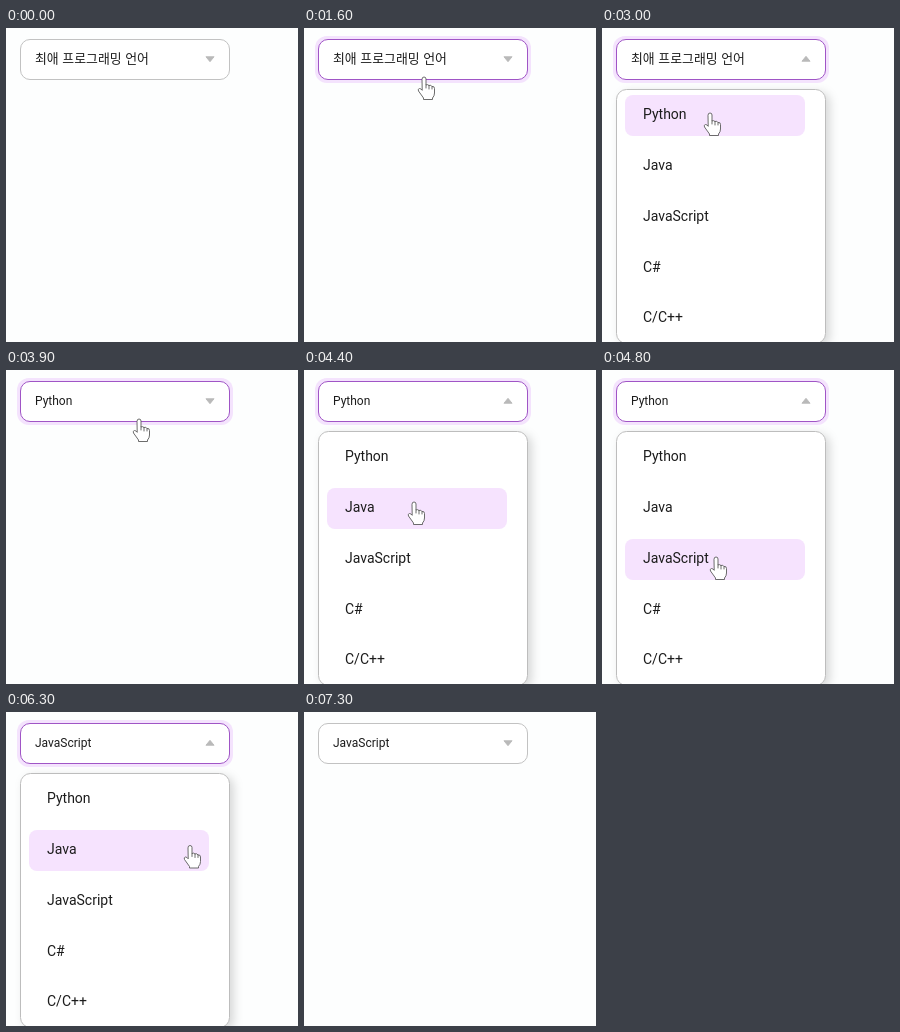
An HTML page that plays this animation: 292 by 314 pixels, repeating every 10000 ms.

```html
<!DOCTYPE html>
<html lang="ko">
<head>
<meta charset="utf-8">
<title>Select box</title>
<style>
html, body { margin: 0; width: 100%; height: 100%; overflow: hidden; background: #fdfefe; }
svg { display: block; }
text { fill: #1c1c1c; font: 14px Roboto, sans-serif; }
#label { font-size: 12px; }
#label.hint { font: 300 12.9px "Noto Sans CJK KR", "Noto Sans CJK", sans-serif; }
#panel { filter: drop-shadow(4px 3px 5px rgba(0, 0, 0, .15)); }
#pointer path { fill: #fff; stroke: #5c5c5c; stroke-width: .9; stroke-linejoin: round; stroke-linecap: round; }
</style>
</head>
<body>
<svg width="292" height="314" viewBox="0 0 292 314">
  <rect id="ring" x="11" y="8" width="216" height="47" rx="12" fill="#f4e3fd"/>
  <rect id="button" x="14.5" y="11.5" width="209" height="40" rx="9.5" fill="#fff"/>
  <text id="label" x="29" y="35"></text>
  <path id="caret" d="M-4.5 -2.5H4.5L0 3Z" fill="#b9b9b9" stroke="#b9b9b9" stroke-linejoin="round"/>
  <g id="list">
    <rect id="panel" x="14.5" y="61.5" width="209" height="254" rx="10" fill="#fff" stroke="#bdbdbd"/>
    <rect id="hover" x="23" width="180" height="41" rx="8" fill="#f6e3fe"/>
  </g>
  <g id="pointer">
    <path id="arrow" d="M.5 .5V16.5L4.3 12.9 6.8 18.8 9.3 17.7 6.8 12H11.5Z"/>
    <path id="hand" d="M-2 2Q-2 0 0 0T2 2V8Q3.5 7 5 8.5 7 7.5 8 9.5 10.5 9 10.5 11.5V16Q10.5 19 8.5 21V22.5H-.5V21L-5.5 14Q-6.5 12 -4.5 11.5 -3 11.5 -2 13ZM2 8V11M5 8.5V12M8 9.5V12"/>
  </g>
</svg>
<script>
const $ = id => document.getElementById(id);
const show = (id, on) => $(id).setAttribute('visibility', on ? 'inherit' : 'hidden');

const LOOP = 10000, STEP = 100, ROW_HEIGHT = 41, EDGE = 49;
const items = ['Python', 'Java', 'JavaScript', 'C#', 'C/C++'];
const rowTop = i => Math.round(67.2 + i * 50.8);
const rowMid = i => rowTop(i) + 18;

items.forEach((name, i) => $('list').insertAdjacentHTML('beforeend',
  `<text x="41" y="${rowTop(i) + 24}">${name}</text>`));

// the list opens shortly after the button takes focus; closing drops both
const visits = [
  { open: 1700, close: 3300, pick: 'Python' },
  { open: 4000, close: 5100, pick: 'JavaScript' },
  { open: 6100, close: 6800 }
];

// the pointer rests between moves
const entry = { x: 160, y: 246 };
const moves = [
  { from: 300, to: 1100, x: 120, y: EDGE },
  { from: 1900, to: 2500, x: 100, y: rowMid(1) - 13 },
  { from: 2600, to: 3000, x: 108, y: rowMid(0) },
  { from: 3200, to: 3800, x: 133, y: EDGE },
  { from: 4000, to: 4400, x: 110, y: rowMid(1) - 4 },
  { from: 4400, to: 4800, x: 114, y: rowMid(2) },
  { from: 5000, to: 5800, x: 125, y: EDGE },
  { from: 6000, to: 6600, x: 243, y: 218 },
  { from: 6900, to: 7300, x: 249, y: 322 }
];

function pointerAt(t) {
  let { x, y } = entry;
  for (const m of moves) {
    const u = Math.min(1, Math.max(0, (t - m.from) / (m.to - m.from)));
    const k = u * u * (3 - 2 * u);
    x += (m.x - x) * k;
    y += (m.y - y) * k;
  }
  return { x, y, visible: t >= moves[0].from && t < moves.at(-1).to };
}

function draw(t) {
  const focus = visits.some(v => t >= v.open - 100 && t < v.close);
  const open = visits.some(v => t >= v.open && t < v.close);
  const picked = visits.findLast(v => v.pick && t >= v.close);
  $('label').textContent = picked ? picked.pick : '최애 프로그래밍 언어';
  $('label').setAttribute('class', picked ? '' : 'hint');
  $('button').setAttribute('stroke', focus ? '#a055c6' : '#c2c2c2');
  $('caret').setAttribute('transform', `translate(204 31) scale(.9 ${open ? -.9 : .9})`);
  show('ring', focus);
  show('list', open);

  const { x, y, visible } = pointerAt(t);
  const row = open && x > 23 && x < 203
    ? items.findIndex((_, i) => y >= rowTop(i) && y < rowTop(i) + ROW_HEIGHT) : -1;
  const hand = row >= 0 || (x > 14 && x < 224 && y > 11 && y < 52);
  $('pointer').setAttribute('transform', `translate(${x} ${y})`);
  show('pointer', visible);
  show('hand', hand);
  show('arrow', !hand);
  show('hover', row >= 0);
  $('hover').setAttribute('y', rowTop(Math.max(row, 0)));

}

let start;
function tick(now) {
  start ??= now;
  draw(Math.floor((now - start) % LOOP / STEP) * STEP);
  requestAnimationFrame(tick);
}
draw(0);
requestAnimationFrame(tick);
</script>
</body>
</html>
```
